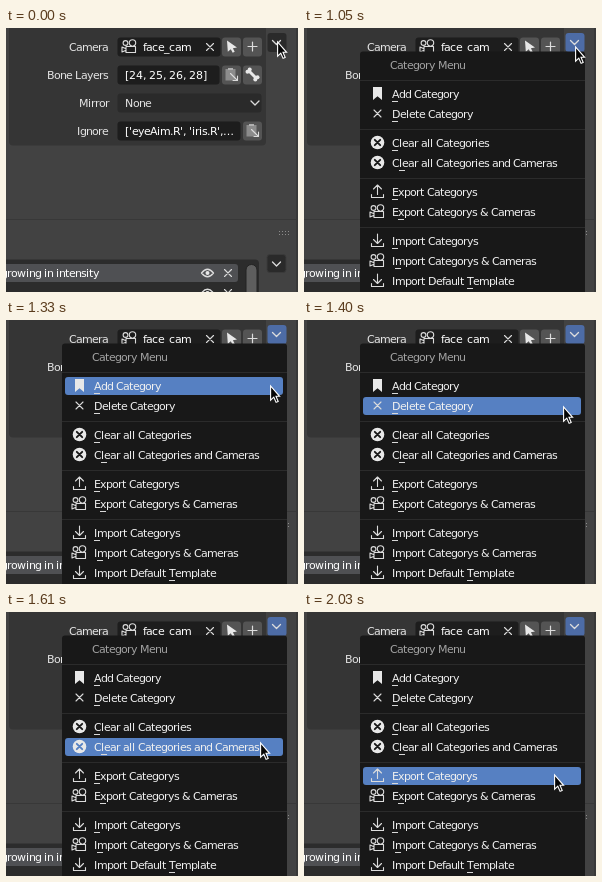
These frames come from a looping animation (292 by 264 pixels, 2.52 s). An HTML page:

```html
<!DOCTYPE html>
<html lang="en">
<head>
<meta charset="utf-8">
<title>Category menu</title>
<style>
  html, body { margin: 0; width: 100%; height: 100%; overflow: hidden; background: #424242; }
  svg { display: block; }
  text { font: 11px "DejaVu Sans", sans-serif; fill: #e4e4e4; white-space: pre; }
  .line { fill: none; stroke: #dcdcdc; stroke-width: 1.1; stroke-linejoin: round; stroke-linecap: round; }
  .solid { fill: #e8e8e8; }
</style>
</head>
<body>
<svg id="stage" width="292" height="264" viewBox="0 0 292 264">
  <defs>
    <mask id="crossCut" maskUnits="userSpaceOnUse" x="-8" y="-8" width="16" height="16">
      <rect x="-8" y="-8" width="16" height="16" fill="#fff"/>
      <path d="M-2.7-2.7 2.7 2.7M2.7-2.7-2.7 2.7" stroke="#000" stroke-width="1.9" stroke-linecap="round"/>
    </mask>
    <g id="cross"><path class="line" d="M-3.5-3.5 3.5 3.5M3.5-3.5-3.5 3.5"/></g>
    <g id="chevron"><path class="line" style="stroke-width:1.3" d="M-4-2 0 2 4-2"/></g>
    <g id="plus"><path class="line" style="stroke-width:1.2" d="M-4.5 0H4.5M0-4.5V4.5"/></g>
    <g id="bookmark"><path class="solid" d="M-4.5-6.5H4.5V6.5L0 2.8-4.5 6.5Z"/></g>
    <g id="clear"><circle class="solid" r="6.8" mask="url(#crossCut)"/></g>
    <g id="export"><path class="line" d="M-6 3V6H6V3M0 3V-6.5M-4-2.5 0-6.5 4-2.5"/></g>
    <g id="import"><path class="line" d="M-6 3V6H6V3M0-6.5V3M-4-1 0 3 4-1"/></g>
    <g id="camera">
      <circle class="line" cx="-4" cy="-3.5" r="2.4"/>
      <circle class="line" cx="3" cy="-3.5" r="3.2"/>
      <path class="line" d="M-3.5 0H6V6H-3.5ZM-3.5 2.2-7.5 .5V5.5L-3.5 3.8"/>
    </g>
    <g id="pick"><path class="solid" d="M-4.5-6 5.5 1 1.4 1.8 3.2 5.2 1.2 6.2-.7 2.7-3.7 5.2Z"/></g>
    <g id="paste">
      <path d="M-6-5.5H4V6H-6Z" fill="#8c8c8c"/>
      <path d="M-3.5-6.5H1.5V-4.5H-3.5Z" fill="#b0b0b0"/>
      <path class="line" d="M-1-1 6 6M6 1.5V6H1.5"/>
    </g>
    <g id="bone">
      <path d="M-3.5-3.5 3.5 3.5" stroke="#e8e8e8" stroke-width="3"/>
      <circle class="solid" cx="-5" cy="-2.8" r="2"/><circle class="solid" cx="-2.8" cy="-5" r="2"/>
      <circle class="solid" cx="5" cy="2.8" r="2"/><circle class="solid" cx="2.8" cy="5" r="2"/>
    </g>
    <g id="eye">
      <path class="line" style="stroke-width:1.3" d="M-6 0Q0-7.5 6 0Q0 7.5-6 0Z"/>
      <circle class="solid" r="2"/>
    </g>
  </defs>
  <g id="panel"></g>
  <g id="menu"></g>
  <path id="pointer" d="M.6 1V15.2L3.8 12.2 6.1 17.4 8.2 16.5 6 11.3H9.6Z" fill="#050505" stroke="#fff" stroke-width="1.1"/>
</svg>
<script>
const LOOP = 2520, OPEN = 700, MOVE = 980, STEP = 70;
const BLUE = '#5680c2', PRESSED = '#4d6ca6', DARK = '#2a2a2a', WHITE = '#fff';
const panel = document.getElementById('panel');
const menu = document.getElementById('menu');
const pointer = document.getElementById('pointer');

function add(parent, tag, attrs) {
  const node = document.createElementNS('http://www.w3.org/2000/svg', tag);
  for (const key in attrs) node.setAttribute(key, attrs[key]);
  return parent.appendChild(node);
}
const box = (parent, x, y, width, height, fill, rx = 0, more = {}) =>
  add(parent, 'rect', { x, y, width, height, fill, rx, ...more });
const icon = (parent, name, x, y) =>
  add(parent, 'use', { href: '#' + name, transform: `translate(${x} ${y})` });

// The interface font sets each glyph on whole pixels, rounding advances down.
const ruler = document.createElement('canvas').getContext('2d');
ruler.font = '2048px "DejaVu Sans", sans-serif';
const advance = ch => Math.floor(Math.round(ruler.measureText(ch).width / 2048 * 11 * 64) / 64);

function positions(str, x) {
  return [...str].map(ch => { const at = x; x += advance(ch); return at; });
}
function label(parent, str, x, y, fill = '#e4e4e4') {
  add(parent, 'text', { x: positions(str, x).join(' '), y, style: `fill:${fill}` }).textContent = str;
}
function button(x, y, name) {
  box(panel, x, y - .5, 19, 19, '#545454', 3);
  icon(panel, name, x + 9.5, y + 8.5);
}

// Settings box
box(panel, 290, 0, 2, 264, '#383838');
box(panel, 3, -6, 257, 123.5, '#353535', 4);
label(panel, 'Camera', 63, 23);
label(panel, 'Bone Layers', 41, 51);
label(panel, 'Mirror', 73, 79);
label(panel, 'Ignore', 71, 107);
const field = (y, w, fill = '#1d1d1d') => box(panel, 111.5, y - .5, w, 19, fill, 3);
field(10, 103);
icon(panel, 'camera', 123.5, 18.5);
label(panel, 'face_cam', 137, 23, WHITE);
icon(panel, 'cross', 204, 19);
button(216, 10, 'pick');
button(237, 10, 'plus');
field(38, 102);
label(panel, '[24, 25, 26, 28]', 119, 51, WHITE);
button(216, 38, 'paste');
button(237, 38, 'bone');
field(66, 144, DARK);
label(panel, 'None', 119, 79);
icon(panel, 'chevron', 249, 75);
field(94, 123);
label(panel, "['eyeAim.R', 'iris.R',…", 119, 107, WHITE);
button(237, 94, 'paste');

// Lower list
box(panel, 0, 191, 290, 1, '#383838');
for (let i = 0; i < 8; i++) box(panel, 273 + 3 * (i % 4), i < 4 ? 203 : 206, 1, 1, '#8c8c8c');
box(panel, -5, 231.5, 258, 40, '#2c2c2c', 4);
box(panel, -5, 236, 237, 18, '#4f5053', 3);
label(panel, 'growing in intensity', -5, 249, WHITE);
for (const y of [245, 265]) {
  icon(panel, 'eye', 201.5, y);
  icon(panel, 'cross', 222, y);
}
box(panel, 240, 236.5, 11, 40, '#5e5e5e', 5.5, { stroke: '#232323' });
box(panel, 261, 226.5, 19, 18, DARK, 3, { stroke: '#3a3a3a' });
icon(panel, 'chevron', 270.5, 236);

const opener = box(panel, 261.5, 5, 19, 19, DARK, 3);
icon(panel, 'chevron', 270.5, 14.5);

// Popup menu: icon, text, centre line, accelerator index
const rows = [
  ['bookmark', 'Add Category', 66, 0],
  ['cross', 'Delete Category', 86, 0],
  ['clear', 'Clear all Categories', 115, 0],
  ['clear', 'Clear all Categories and Cameras', 135, 1],
  ['export', 'Export Categorys', 164, 0],
  ['camera', 'Export Categorys & Cameras', 184, 1],
  ['import', 'Import Categorys', 213, 0],
  ['camera', 'Import Categorys & Cameras', 233, 1],
  ['import', 'Import Default Template', 253, 15]
];
box(menu, 56, 23.5, 225, 250, '#181818', 3);
label(menu, 'Category Menu', 86, 41, '#a3a3a3');
for (const y of [52, 101, 150, 199]) box(menu, 56, y, 225, 1, '#2b2b2b');
const highlight = box(menu, 59, 0, 218, 18, BLUE, 3);
for (const [name, str, y, key] of rows) {
  icon(menu, name, 73.5, y - .5);
  label(menu, str, 88, y + 4, '#f0f0f0');
  box(menu, positions(str, 88)[key], y + 7, 6, 1, '#d8d8d8');
}

const path = [
  [271, 15], [271, 18], [270, 24], [269, 33], [268, 45], [264, 65], [259, 86], [258, 96],
  [256, 116], [254, 130], [252, 142], [251, 152], [251, 157], [250, 160], [250, 161], [250, 162]
];

function draw(t) {
  const open = t >= OPEN;
  const step = Math.min(path.length - 1, Math.floor((t - MOVE) / STEP));
  const [x, y] = step < 0 ? [271, 13] : path[step];
  const row = rows.find(r => Math.abs(r[2] - y) <= 10);
  menu.style.display = open ? '' : 'none';
  opener.setAttribute('fill', open ? PRESSED : DARK);
  highlight.style.display = row ? '' : 'none';
  if (row) highlight.setAttribute('y', row[2] - 9);
  pointer.setAttribute('transform', `translate(${x} ${y})`);
}

const start = performance.now();
function tick() {
  draw((performance.now() - start) % LOOP);
  requestAnimationFrame(tick);
}
tick();
</script>
</body>
</html>
```
